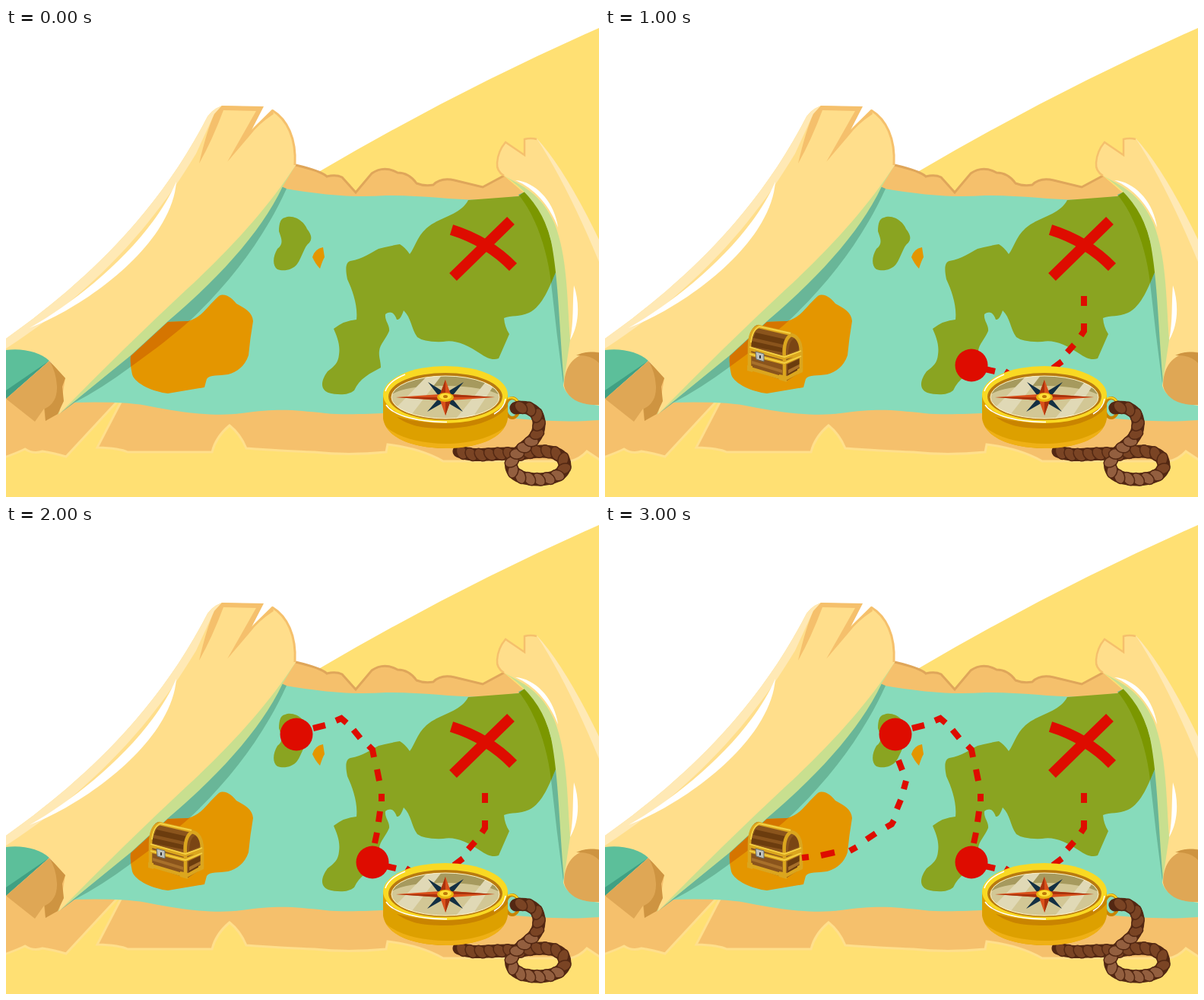
These frames come from a looping animation (780 by 616 pixels, 4 s). An HTML page:

```html
<!DOCTYPE html>
<html lang="en">
<head>
<meta charset="utf-8">
<title>Treasure map</title>
<style>
html, body { margin: 0; width: 100%; height: 100%; overflow: hidden; background: #fff; }
svg { display: block; width: 100%; height: 100%; }
.step { visibility: hidden; }
.route { fill: none; stroke: #de0c00; stroke-width: 8; }
.red { fill: #de0c00; }
</style>
</head>
<body>
<svg viewBox="0 0 780 616">
  <defs>
    <path id="shadowL" d="M362 208L369 211C340 275 295 335 240 386C210 412 185 430 164 445Q125 474 90 492L70 507L163 430L213 385C270 335 325 280 362 208Z"/>
    <path id="shadowR" d="M674 219C696 245 712 290 717 335Q724 400 733 467L738 420L724 318Q716 250 685 214Z"/>
    <path id="land" d="M608 226L674 221L685 213Q716 250 724 318C715 340 706 365 688 374C675 380 665 377 655 381Q656 393 662 402L648 434C640 437 632 433 626 429C605 415 590 409 575 412Q550 413 541 406C533 395 533 380 523 371C521 377 518 384 514 383C511 374 506 371 499 376C498 385 505 390 504 398C500 408 492 415 491 424C490 433 493 437 493 446C480 453 465 460 458 476C450 483 435 482 424 479C412 474 415 462 423 451C432 444 437 440 438 429C440 415 435 405 431 395Q445 384 461 383C463 365 456 345 449 330C446 315 447 308 453 306C470 303 480 295 490 290Q505 286 518 284Q525 288 531 297C538 288 540 275 553 263C570 248 598 246 608 226Z"/>
    <path id="isle" d="M213 386L240 385C258 380 265 365 280 352C288 347 298 355 303 362C314 368 324 373 325 385Q321 408 319 430C314 445 303 452 292 455C280 457 268 455 264 461L261 472L213 480C195 478 170 468 166 455Q163 443 164 431Z"/>
    <clipPath id="landClip"><use href="#land"/></clipPath>
    <clipPath id="isleClip"><use href="#isle"/></clipPath>
    <clipPath id="face"><ellipse cx="578" cy="485" rx="71" ry="28"/></clipPath>
  </defs>

  <!-- sand and parchment -->
  <path fill="#ffe073" d="M413 188Q590 84 780 0V616H0V520L380 300Z"/>
  <path fill="#f5c06c" stroke="#ffdf8c" stroke-width="3" d="M-5 565Q15 558 25 553Q35 560 48 556Q62 558 79 563L158 478L120 551Q150 552 160 557L271 557Q276 537 294 522Q308 533 316 552Q370 556 405 557Q450 562 500 557L502 547Q545 552 575 569L742 569Q755 566 764 556L785 570V420L680 240L370 230L-5 490Z"/>
  <path fill="#f5c06c" d="M381 180Q415 188 422 195Q434 192 442 196L460 216L481 191Q497 180 515 190Q530 190 540 204Q550 208 562 206Q572 196 590 200L627 209L655 194L690 224L500 240L350 222Z"/>
  <path fill="none" stroke="#dfa65a" stroke-width="3" d="M381 180Q415 188 422 195Q434 192 442 196L460 216L481 191Q497 180 515 190Q530 190 540 204Q550 208 562 206Q572 196 590 200L627 209L655 194"/>

  <!-- sea and land -->
  <path fill="#87dbbb" d="M362 210C420 220 460 223 500 220C550 219 600 228 640 225L682 220L735 300L780 420V515C740 518 700 516 660 512L500 506C480 506 450 509 420 506C380 502 360 499 310 506C280 510 240 507 190 497Q160 490 85 492L200 385Z"/>
  <use href="#shadowL" fill="#69b698"/>
  <use href="#shadowR" fill="#69b698"/>
  <use href="#land" fill="#8aa421"/>
  <use href="#shadowR" fill="#7b9700" clip-path="url(#landClip)"/>
  <use href="#isle" fill="#e49600"/>
  <use href="#shadowL" fill="#d57500" clip-path="url(#isleClip)"/>
  <path fill="#8aa421" d="M367 249C375 245 390 250 396 264Q405 275 399 282C392 287 390 300 383 310C377 318 365 320 357 317C350 312 351 300 357 290C366 283 362 276 359 267C359 257 361 250 367 249Z"/>
  <path fill="#e49600" d="M417 288Q406 290 403 301Q407 310 413 316Q416 306 419 301Z"/>

  <!-- left roll -->
  <path fill="#c8df8f" d="M381 180L364 208C335 270 275 333 213 385L163 431L68 508L90 470L300 250Z"/>
  <path fill="#ffde8b" d="M284 102L338 104L323 133L350 107C370 118 382 145 381 180C347 233 296 290 239 342Q154 421 70 507L78 460L57 437Q35 422 0 423V408C110 330 200 240 262 122Q268 108 284 102Z"/>
  <path fill="#ffe9b5" d="M284 102Q268 108 262 122C200 240 110 330 0 408V421C110 350 190 265 250 165L274 113Z"/>
  <path fill="#f5c06c" d="M284 102L339 103L323 134L350 107L352 113Q332 126 320 142L291 176L329 109L286 108Q271 148 254 178Q264 135 274 113Z"/>
  <path fill="none" stroke="#f5c06c" stroke-width="3" d="M350 108C370 120 382 145 380 180"/>
  <path fill="#fff" d="M224 202C190 280 100 355 31 394C105 366 218 284 224 202Z"/>
  <path fill="#5cbf9a" d="M0 423C20 420 45 425 57 437L0 487Z"/>
  <path fill="#40a083" d="M57 437L0 476V487Z"/>
  <path fill="#dfa755" d="M57 437L0 487L38 517L50 500L52 516L70 500L74 465Z"/>
  <path fill="#ce9441" d="M57 437L78 460L74 471L76 490L68 507L52 516L51 500Q68 492 67 470Q66 452 57 437Z"/>

  <!-- right roll -->
  <path fill="#c8df8f" d="M655 194Q704 225 717 280C727 330 728 400 734 465L745 410L735 280L700 215Z"/>
  <path fill="#ffde8b" d="M657 149L681 167L682 146Q690 144 698 145Q735 185 780 278V496Q740 492 733 470L742 410C738 350 738 300 722 258C705 218 680 208 655 194Q645 188 645 177Q646 163 657 149Z"/>
  <path fill="#ffe9b5" d="M698 145Q735 185 780 278V307Q738 206 698 145Z"/>
  <path fill="none" stroke="#f5c06c" stroke-width="2.5" d="M655 194Q645 188 646 177Q647 162 657 150L682 167L682 146Q690 144 698 146"/>
  <path fill="#fff" d="M670 200C698 202 722 230 726 262C716 236 698 212 670 200ZM747 338C755 362 754 390 742 410C747 385 745 360 747 338Z"/>
  <path fill="#dfa755" d="M780 426C748 424 734 444 734 470C738 487 756 496 780 495Z"/>
  <path fill="#ce9441" d="M750 430Q765 423 780 427V440Q770 429 750 430Z"/>

  <path fill="none" stroke="#de0c00" stroke-width="14" d="M586 265Q634 280 667 314M588 327L664 253"/>

  <!-- chest, then the three legs of the route -->
  <g class="step">
    <path fill="#8a541c" d="M188 420Q189 395 200 390L244 400Q260 406 260 450L238 464L189 448Z"/>
    <path fill="#6b3c0e" d="M198 400L238 409L235 416L195 407ZM193 411L233 420V426L192 418ZM240 442L257 434V448L240 459Z"/>
    <path fill="#a8702a" d="M193 437L233 449V453L193 441ZM241 449L257 441V445L241 454Z"/>
    <path fill="#7a4514" d="M241 428Q242 410 249 408Q256 412 256 422Z"/>
    <path fill="none" stroke="#dba61e" stroke-width="4.5" d="M190 447L237 461L259 449M190 420V447M236 434V462M258 424V450M190 420Q190 396 202 392L245 402M236 433Q234 409 245 403Q258 406 258 427ZM190 421L236 434M190 428L236 440L258 430"/>
    <path fill="none" stroke="#f6d344" stroke-width="1.8" d="M190 419L236 432L258 424M192 413Q194 396 203 392L244 401M190 428L236 440L258 431"/>
    <path fill="#dba61e" d="M187 443l7 1v8l-7-2ZM229 455l10 2v8l-10-3ZM253 448l7-3v7l-7 3Z"/>
    <path fill="#bfc2bd" stroke="#656c6b" d="M198 425L209 428V438L199 435Z"/>
    <path stroke="#333" stroke-width="2" d="M204 430v4"/>
    <path class="route" d="M630 352v13M630 388v10l-4 6M617 416l-9 10M601 438l-12 9M534 456l-8-5M513 451l-13-3"/>
    <circle class="red" cx="482" cy="443" r="21.5"/>
  </g>
  <g class="step">
    <path class="route" d="M404 267l16-4M434 257l7-3l7 6M457 269l9 11M477 290l5 5l2 10M488 321l3 15M494 353v10M492 376l-2 14M488 404l-3 14"/>
    <circle class="red" cx="382" cy="275" r="21.5"/>
  </g>
  <g class="step">
    <path class="route" d="M386 309l5 13M396 336l-3 11M389 361l-5 12M380 388l-3 5l-7 4M356 405l-12 8M331 423l-9 5M302 430l-18 4M268 436l-9 1"/>
  </g>

  <!-- rope and compass -->
  <ellipse cx="666" cy="499" rx="9" ry="13" fill="none" stroke="#c98400" stroke-width="4"/>
  <path fill="none" stroke="#f9d923" stroke-width="2" d="M659 487Q670 482 675 494"/>
  <path id="rope" fill="none" stroke="#532813" stroke-width="17" stroke-linecap="round" d="M596 556C620 566 645 556 675 560C700 554 735 552 735 575C732 594 700 594 688 592C668 590 660 577 667 566C678 548 700 545 701 522C702 503 688 496 671 499"/>
  <g id="strands" stroke="#532813" stroke-width="1.5"></g>
  <path fill="#dda000" d="M496 481V513C500 540 540 552 578 552S656 540 660 513V481Z"/>
  <path fill="#efb015" d="M500 524C512 544 545 552 578 552S645 544 656 524C640 538 610 546 578 546S516 538 500 524Z"/>
  <path fill="#c98400" d="M578 519C610 519 646 510 660 488V497C646 516 610 526 578 526S530 522 514 511Q545 519 578 519Z"/>
  <ellipse cx="578" cy="481.5" rx="82" ry="37.5" fill="#f9d923"/>
  <path fill="none" stroke="#fff" stroke-width="1.5" d="M500 495C510 510 545 518 580 517.5M499 477Q503 464 525 455M642 507Q656 499 657 487"/>
  <ellipse cx="578" cy="484" rx="75" ry="31" fill="#b87a10"/>
  <ellipse cx="578" cy="485" rx="71" ry="28" fill="#d2c795"/>
  <g clip-path="url(#face)">
    <path fill="#a69a5e" d="M500 487Q510 456 578 456T656 487Q640 471 578 470T500 487Z"/>
    <path fill="#e0d9b6" d="M510 502L556 455H574L530 512ZM592 513L635 460H648L612 514Z"/>
  </g>
  <ellipse cx="578" cy="485" rx="71" ry="28" fill="none" stroke="#fff3c5"/>
  <path fill="#132f43" d="M555 465L584 483L601 504L572 487ZM602 465L572 483L554 504L584 487Z"/>
  <path fill="#d9501b" d="M513 485L571 481L578 462L585 481L643 485L585 489L578 509L571 489Z"/>
  <path fill="#a9320c" d="M513 485H578L571 489ZM643 485H578L585 481ZM578 462V485L571 481ZM578 509V485L585 489Z"/>
  <ellipse cx="578" cy="485" rx="11" ry="6" fill="#e8b511"/>
  <ellipse cx="578" cy="484" rx="8" ry="4" fill="#ffdf38"/>
  <ellipse cx="578" cy="484" rx="3" ry="2" fill="#bd7808"/>
</svg>
<script>
const rope = document.getElementById('rope');
const strands = document.getElementById('strands');
const length = rope.getTotalLength();

// Slanted lumps along the path give the twisted look.
for (let s = 4; s < length; s += 12.5) {
  const p = rope.getPointAtLength(s), q = rope.getPointAtLength(s + 1);
  const turn = Math.atan2(q.y - p.y, q.x - p.x) * 180 / Math.PI;
  const lump = document.createElementNS('http://www.w3.org/2000/svg', 'ellipse');
  const light = s > length * .45 && s < length * .83;
  const attrs = {
    rx: 9.5, ry: 6.8, fill: light ? '#935f3f' : '#7a4424',
    transform: `translate(${p.x} ${p.y}) rotate(${turn + 45})`
  };
  for (const name in attrs) lump.setAttribute(name, attrs[name]);
  strands.append(lump);
}

const steps = document.querySelectorAll('.step');
function draw(now) {
  const step = Math.floor(now % 4000 / 1000);
  steps.forEach((el, i) => el.style.visibility = step > i ? 'visible' : 'hidden');
  requestAnimationFrame(draw);
}
draw(0);
</script>
</body>
</html>
```
